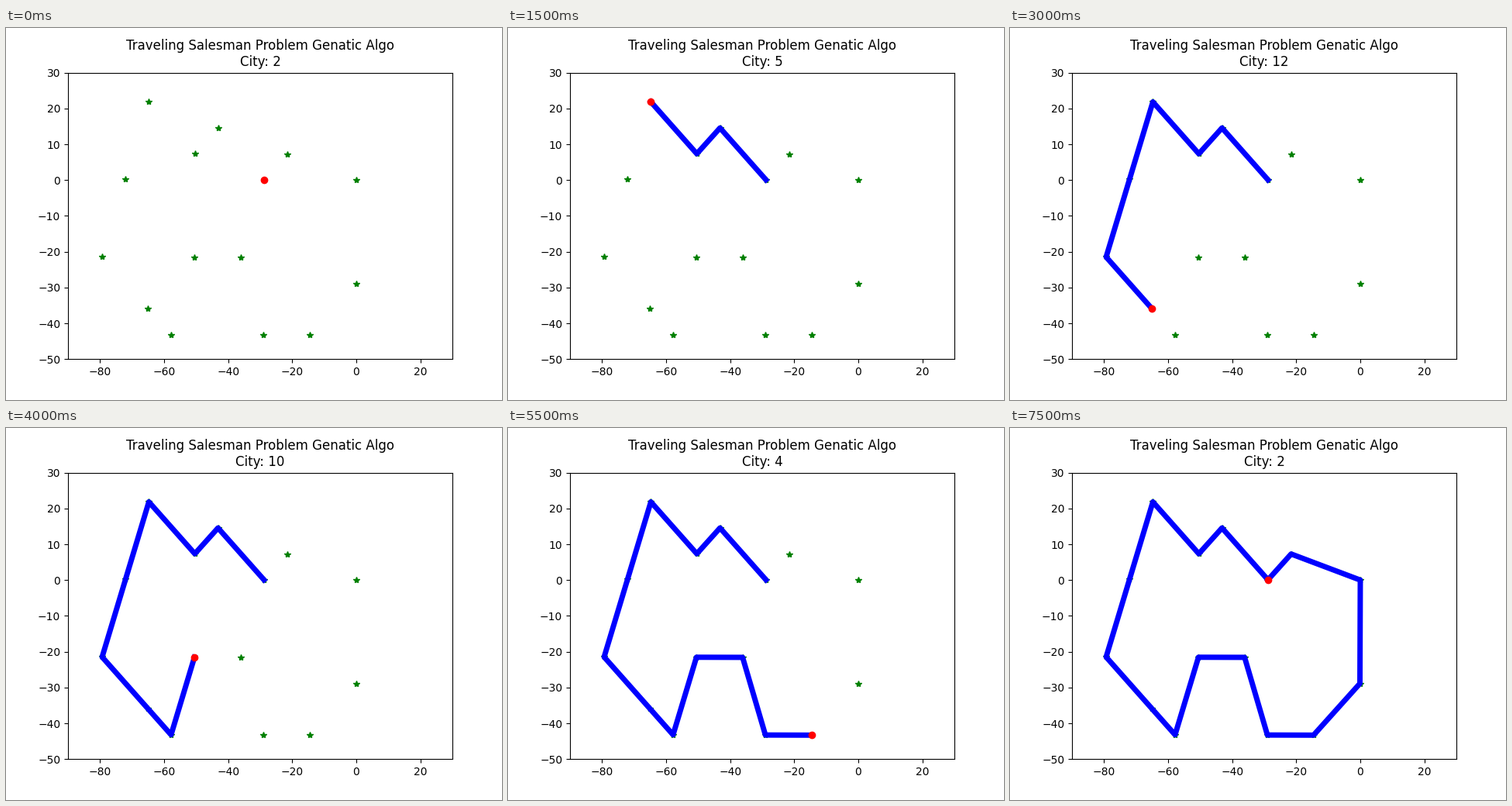
A matplotlib script that plays this animation: 640x480 px, repeating every 8000 ms.

```python
import matplotlib.pyplot as plt
from matplotlib.animation import FuncAnimation
import numpy as np

STEP_MS = 500

# Cities sit on a slightly skewed lattice; the tour is a chain of hops on it.
START = (-4, 0)
HOPS = [(-2, 2), (-1, -1), (-2, 2), (-1, -3), (-1, -3), (2, -2), (1, -1),
        (1, 3), (2, 0), (1, -3), (2, 0), (2, 2), (0, 4), (-3, 1), (-1, -1)]
LATTICE = np.array([(7.205, -0.017), (0.03, 7.225)])
CITY_ORDER = [2, 15, 9, 5, 7, 3, 12, 14, 10, 8, 6, 4, 11, 1, 13]

path = np.cumsum([START] + HOPS, axis=0) @ LATTICE
labels = CITY_ORDER + CITY_ORDER[:1]

fig, ax = plt.subplots(figsize=(6.4, 4.8), dpi=100)
ax.set_xlim(-90, 30)
ax.set_ylim(-50, 30)
ax.plot(*path[:-1].T, "g*")
route, = ax.plot([], [], "b-", linewidth=5)
traveler, = ax.plot([], [], "ro")
title = ax.set_title("")


def update(step):
    route.set_data(*path[:step + 1].T)
    traveler.set_data(*path[step:step + 1].T)
    title.set_text(f"Traveling Salesman Problem Genatic Algo\nCity: {labels[step]}")
    return route, traveler, title


anim = FuncAnimation(fig, update, frames=len(path), interval=STEP_MS,
                     init_func=lambda: update(0), repeat=True,
                     repeat_delay=0, blit=False)
plt.show()
```
